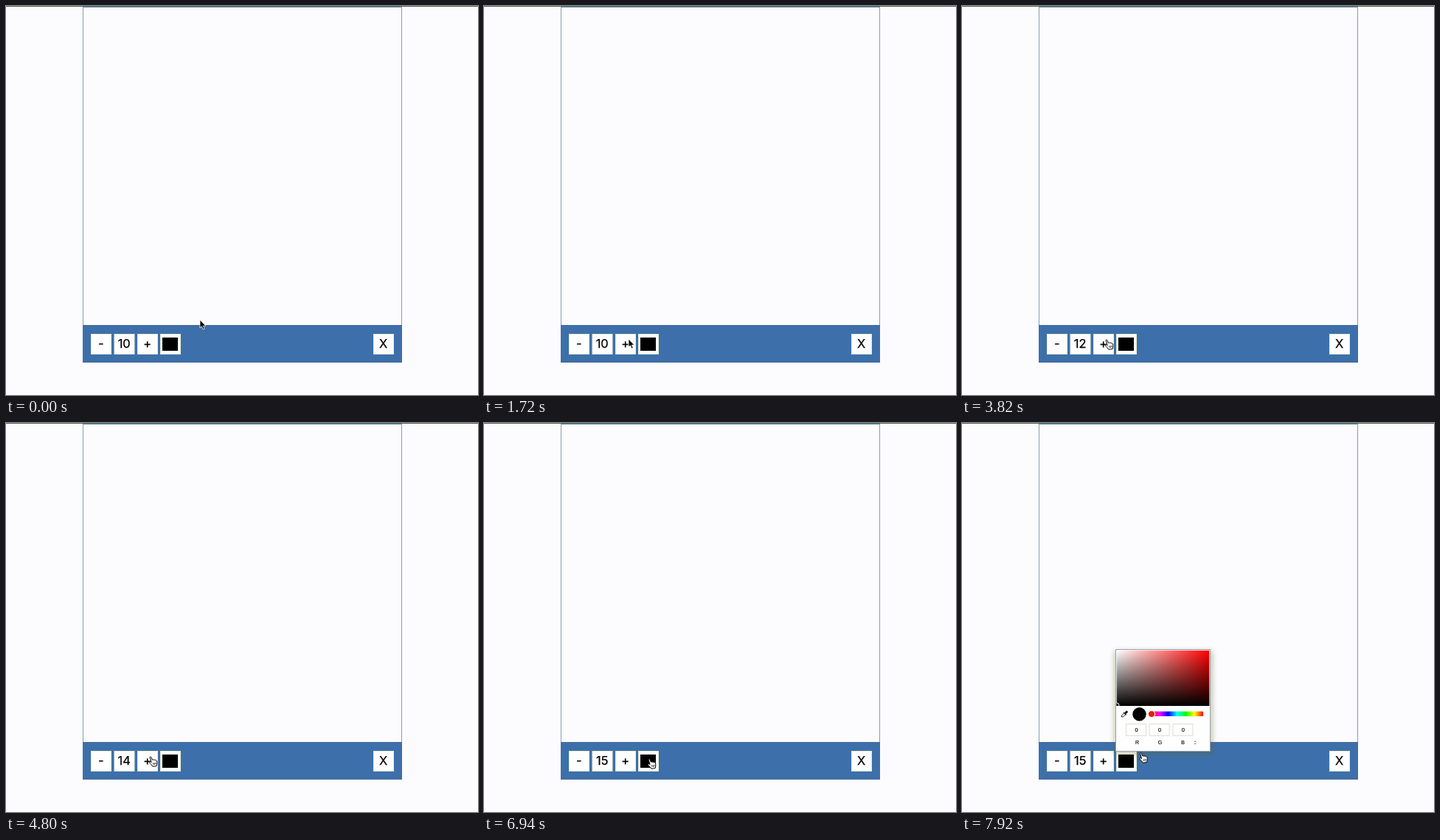
Recreate the animation shown at these times as an HTML page. Size 640 by 528 pixels, loop 8000 ms.

```html
<!DOCTYPE html>
<html lang="en">
<head>
<meta charset="utf-8">
<style>
html, body { margin: 0; width: 100%; height: 100%; overflow: hidden; background: #fcfcfe; }
svg { display: block; width: 640px; height: 528px; }
.label { font: 16.5px Inter, sans-serif; fill: #000; stroke: #000; stroke-width: .25; text-anchor: middle; }
.tiny { font: 7.5px "Liberation Sans", Arial, sans-serif; fill: #000; stroke: #000; stroke-width: .15; text-anchor: middle; }
.button { fill: #fefefe; stroke: #e9efd2; stroke-width: 1; }
.field { fill: #fff; stroke: #deded0; stroke-width: 1; }
</style>
</head>
<body>
<svg viewBox="0 0 640 528">
  <defs>
    <linearGradient id="tint"><stop stop-color="#fff"/><stop offset="1" stop-color="#f00"/></linearGradient>
    <linearGradient id="shade" x2="0" y2="1"><stop stop-color="#000" stop-opacity="0"/><stop offset="1"/></linearGradient>
    <linearGradient id="hue">
      <stop stop-color="#f00"/><stop offset=".167" stop-color="#f0f"/>
      <stop offset=".333" stop-color="#00f"/><stop offset=".5" stop-color="#0ff"/>
      <stop offset=".667" stop-color="#0f0"/><stop offset=".833" stop-color="#ff0"/>
      <stop offset="1" stop-color="#f00"/>
    </linearGradient>
    <filter id="blur" x="-20%" y="-20%" width="140%" height="140%"><feGaussianBlur stdDeviation="3.5"/></filter>
    <clipPath id="area"><rect x="209.5" y="308.5" width="126" height="75.5"/></clipPath>
  </defs>

  <rect width="640" height="528" fill="#fcfcfe"/>
  <path d="M0 .5H640" stroke="#566052"/>
  <path d="M104.5 434V1.5H536.5V434" fill="none" stroke="#7fa0b2"/>
  <path d="M104 1H537" stroke="#41707c"/>
  <rect x="104" y="433" width="433" height="51" fill="#3d70aa"/>
  <path d="M104 433.5H537M104 483.5H537" stroke="#42689a"/>
  <g id="buttons"></g>
  <rect x="212" y="450" width="21" height="18" fill="#000"/>

  <g id="picker">
    <rect x="206" y="309" width="134" height="141" fill="#60602c" opacity=".33" filter="url(#blur)"/>
    <rect x="208.5" y="307.5" width="128" height="138" fill="#fefefe" stroke="#98a2a8"/>
    <g clip-path="url(#area)">
      <rect x="209.5" y="308.5" width="126" height="75.5" fill="url(#tint)"/>
      <rect x="209.5" y="308.5" width="126" height="75.5" fill="url(#shade)"/>
      <circle cx="210" cy="383" r="3" fill="#000" stroke="#fff"/>
    </g>
    <g transform="translate(220.5 395) rotate(45)">
      <path d="M-1.3 0V4.2L0 5.6L1.3 4.2V0" fill="#fff" stroke="#111" stroke-width=".9"/>
      <path d="M-2.6 -.6H2.6M0 -1V-4" stroke="#111" stroke-width="1.3"/>
      <rect x="-1.5" y="-5.5" width="3" height="4.2" rx="1.3" fill="#111"/>
    </g>
    <circle cx="240.5" cy="395.2" r="9.2" fill="#000"/>
    <rect x="256" y="391.5" width="71" height="6.5" rx="1" fill="url(#hue)"/>
    <circle cx="257" cy="395" r="4.6" fill="#f01808" stroke="#fff" stroke-width="1.2"/>
    <g id="fields"></g>
    <path d="M315 433L316.2 431.6L317.4 433M315 434.6L316.2 436L317.4 434.6" fill="none" stroke="#444" stroke-width=".7"/>
  </g>

  <path id="arrow" d="M0 0V11L2.5 8.8L4.2 13L6.2 12.1L4.4 8.2H7.8Z" fill="#000" stroke="#fff" stroke-width=".8"/>
  <g id="hand" stroke="#000" stroke-linejoin="round">
    <path d="M.2 1.2C-.2 -.3 1.4 -.6 2 .8L3.4 4.3C4 3.5 5 3.7 5.3 4.4C6 3.7 7 4 7.3 4.8C8.3 4.2 9.2 4.8 9.5 5.8C10.1 8 9.8 10 9 12.6L3.9 13.2C2.9 11.2 1 10 -.5 8.2C-1.4 7 .1 6.1 1.2 7L2.1 7.7Z" fill="#fff"/>
    <path d="M4.4 8.2L5 11M6.1 8L6.6 10.8M7.8 7.7L8 10.5" fill="none" stroke-width=".7"/>
  </g>
</svg>
<script>
const $ = id => document.getElementById(id);
const LOOP = 8000;

const button = (x, text, id) =>
  `<rect class="button" x="${x + .5}" y="445.5" width="27" height="27"/>` +
  `<text class="label" x="${x + 13.7}" y="464"${id ? ` id="${id}"` : ""}>${text}</text>`;
$("buttons").innerHTML = button(115, "-") + button(146.5, "10", "size") +
  button(178, "+") + button(209, "") + button(498, "X");

$("fields").innerHTML = [..."RGB"].map((name, i) => {
  const x = 222.5 + i * 31.7;
  return `<rect class="field" x="${x}" y="408.5" width="27" height="16"/>
    <text class="tiny" x="${x + 14}" y="419.2">0</text>
    <text class="tiny" x="${237.5 + i * 31}" y="436" style="font-size:7px">${name}</text>`;
}).join("");

// Pointer stops: time, x, y
const path = [
  [0, 263, 426], [780, 196, 452], [2900, 196, 452], [3100, 195, 453],
  [5650, 195, 453], [6060, 209, 453.5], [6440, 223, 456],
  [7600, 223, 456], [7900, 241.5, 448], [LOOP, 241.5, 448]
];
const clicks = [3160, 3600, 4040, 4480, 5140];
const HAND_AT = 2960, OPEN_AT = 6960;

function pointer(t) {
  const i = path.findIndex(p => p[0] > t);
  const [t0, x0, y0] = path[i - 1], [t1, x1, y1] = path[i];
  const u = (t - t0) / (t1 - t0), e = u * u * (3 - 2 * u);
  return `translate(${x0 + (x1 - x0) * e} ${y0 + (y1 - y0) * e})`;
}

const show = (id, on) => $(id).setAttribute("visibility", on ? "visible" : "hidden");

function draw(t) {
  $("size").textContent = 10 + clicks.filter(c => t >= c).length;
  show("picker", t >= OPEN_AT);
  show("arrow", t < HAND_AT);
  show("hand", t >= HAND_AT);
  const at = pointer(t);
  $("arrow").setAttribute("transform", at);
  $("hand").setAttribute("transform", at);
}

const start = performance.now();
function tick() {
  draw((performance.now() - start) % LOOP);
  requestAnimationFrame(tick);
}
tick();
</script>
</body>
</html>
```
